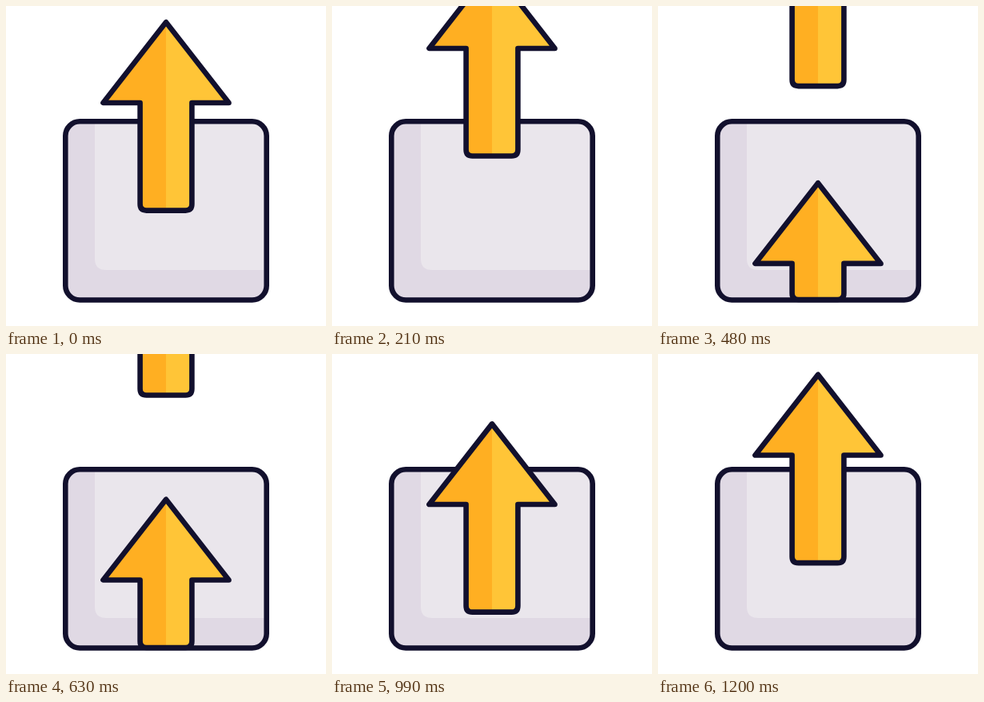
An HTML page for the animation above (1230 ms loop, 400 by 400 pixels).

```html
<!DOCTYPE html>
<html lang="en">
<head>
<meta charset="utf-8">
<title>Upload</title>
<style>
  html, body { margin: 0; width: 100%; height: 100%; overflow: hidden; background: #fff; }
  svg { display: block; width: 100vw; height: 100vh; }
  .ink { stroke: #12102d; stroke-width: 6.6; stroke-linejoin: round; }
</style>
</head>
<body>
<svg viewBox="0 0 400 400">
  <defs>
    <linearGradient id="gold" gradientUnits="userSpaceOnUse" x1="0" y1="0" x2="400" y2="0">
      <stop offset=".5" stop-color="#ffaf22"/>
      <stop offset=".5" stop-color="#ffc537"/>
    </linearGradient>
  </defs>
  <rect x="74.3" y="144.3" width="251.4" height="223.2" rx="18" fill="#e0d9e4"/>
  <path d="M111 145H308Q325 145 325 162V330H125Q111 330 111 316Z" fill="#eae6ec"/>
  <rect class="ink" x="74.3" y="144.3" width="251.4" height="223.2" rx="18" fill="none"/>
  <path id="leaving" class="ink" fill="url(#gold)"/>
  <path id="rising" class="ink" fill="url(#gold)"/>
</svg>
<script>
const LOOP = 1230, STEP = 30;
const FLOOR = 367;            // centre of the box's lower edge
const TIP = 20.3, HEAD = 121, FOOT = 255.6;
const SLOPE = 0.78, STEM = 32.4;

// [time, offset below the rest position]
const rise = [[212, 347], [356, 233.5], [630, 161.5], [840, 111], [1219, 0]];

const leaving = document.getElementById('leaving');
const rising = document.getElementById('rising');

function offsetAt(t) {
  if (t <= rise[0][0]) return rise[0][1];
  for (let i = 1; i < rise.length; i++) {
    const [t0, y0] = rise[i - 1], [t1, y1] = rise[i];
    if (t < t1) return y0 + (y1 - y0) * (t - t0) / (t1 - t0);
  }
  return 0;
}

// The arrow grows out of the floor: anything below it is not built yet.
function arrow(dy) {
  const tip = TIP + dy, head = Math.min(HEAD + dy, FLOOR), foot = Math.min(FOOT + dy, FLOOR);
  if (tip >= FLOOR) return '';
  const w = (head - tip) * SLOPE, l = 200 - STEM, r = 200 + STEM;
  const start = `M200 ${tip}L${200 - w} ${head}`;
  if (foot <= head) return `${start}H${200 + w}Z`;
  const c = Math.min(8, foot - head);
  return `${start}H${l}V${foot - c}Q${l} ${foot} ${l + c} ${foot}` +
    `H${r - c}Q${r} ${foot} ${r} ${foot - c}V${head}H${200 + w}Z`;
}

function draw(ms) {
  const t = Math.floor((ms % LOOP) / STEP) * STEP;
  leaving.setAttribute('d', arrow(-0.324 * t));
  rising.setAttribute('d', arrow(offsetAt(t)));
}

let origin;
function tick(now) {
  origin ??= now;
  draw(Math.max(0, now - origin));
  requestAnimationFrame(tick);
}
draw(0);
requestAnimationFrame(tick);
</script>
</body>
</html>
```
